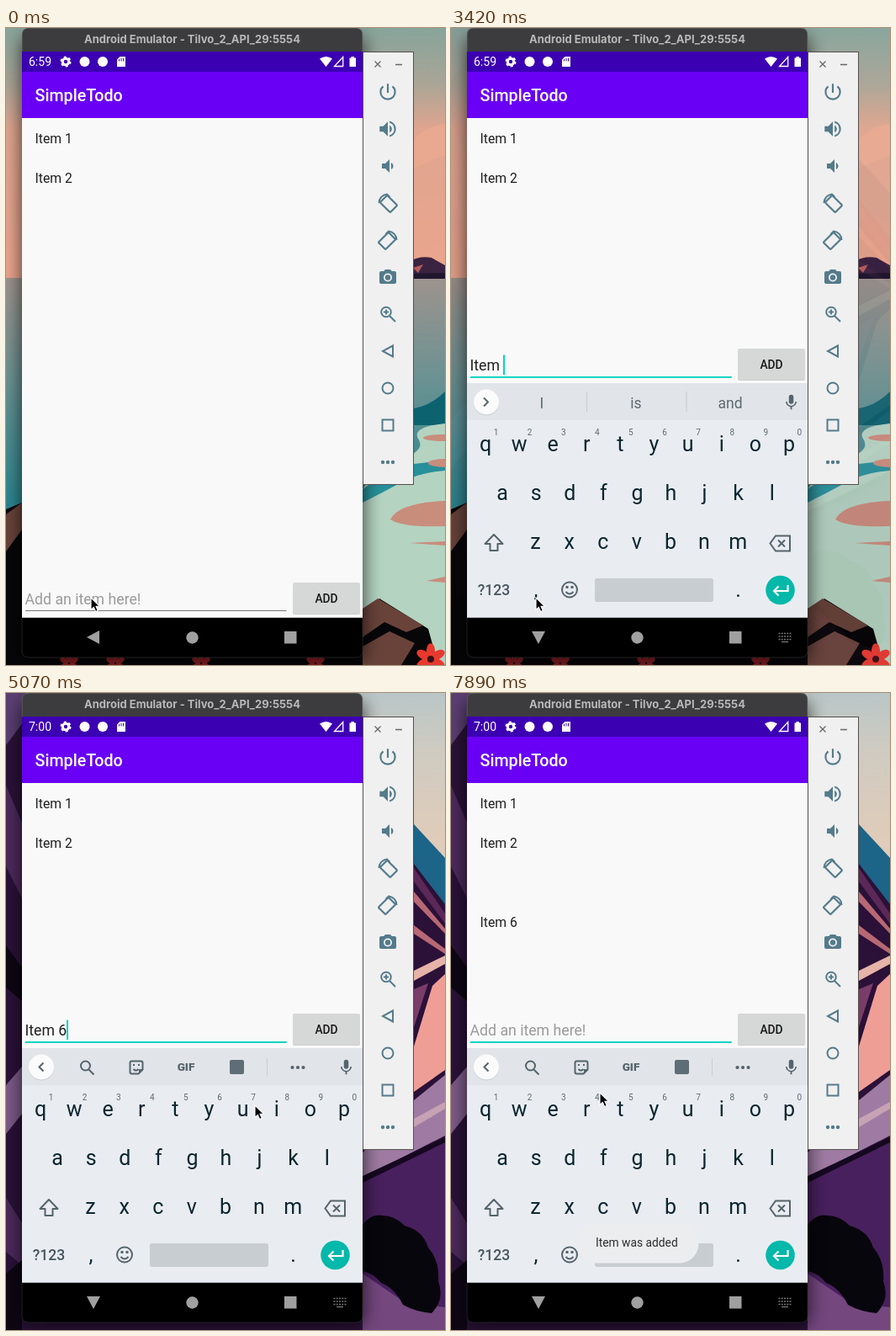
Recreate the animation shown at these times as an HTML page. Size 522 by 757 pixels, loop 8000 ms.

```html
<!DOCTYPE html>
<html lang="en">
<head>
<meta charset="utf-8">
<title>Todo list in an emulator</title>
<style>
html, body { margin: 0; width: 100%; height: 100%; overflow: hidden; background: #123; }
svg { display: block; width: 522px; height: 757px; font-family: Roboto, sans-serif; }
text { white-space: pre; }
.mid { text-anchor: middle; }
.item { font-size: 15.75px; fill: #1f1f1f; }
.edit { font-size: 17.7px; fill: #1f1f1f; }
.typing { text-decoration: underline; }
.hint { fill: #9a9a9a; }
.key { font-size: 25px; fill: #0b2530; text-anchor: middle; }
.num { font-size: 10px; fill: #5c6b73; text-anchor: middle; }
.sug { font-size: 17.5px; fill: #5c6a71; text-anchor: middle; }
.best { font-weight: 700; fill: #0b1518; }
.line { fill: none; stroke: #54646c; stroke-width: 2; }
.tool { fill: none; stroke: #547b8b; stroke-width: 2; }
</style>
</head>
<body>
<svg viewBox="0 0 522 757">
  <defs>
    <linearGradient id="dusk" x2="0" y2="1">
      <stop offset="0" stop-color="#87a49b"/><stop offset=".22" stop-color="#a9a596"/>
      <stop offset=".4" stop-color="#dfa58f"/><stop offset="1" stop-color="#eba58d"/>
    </linearGradient>
    <linearGradient id="lake" x2="0" y2="1">
      <stop offset="0" stop-color="#9d938d"/><stop offset=".25" stop-color="#6d9292"/>
      <stop offset=".6" stop-color="#298690"/><stop offset="1" stop-color="#0a6877"/>
    </linearGradient>
    <linearGradient id="haze" gradientUnits="userSpaceOnUse" x1="0" x2="0" y1="0" y2="170">
      <stop offset="0" stop-color="#b9c6c6"/><stop offset=".4" stop-color="#cfcbc1"/><stop offset="1" stop-color="#dfccba"/>
    </linearGradient>
    <filter id="soft" x="-20%" y="-20%" width="140%" height="140%"><feGaussianBlur stdDeviation="10"/></filter>
  </defs>

  <g id="lakeside">
    <path fill="url(#dusk)" d="M0 0H522V298H0Z"/>
    <path fill="#e9a890" d="M470 150q20-32 52-36v38q-20 6-52 22Z"/>
    <path fill="url(#lake)" d="M0 297H522V757H0Z"/>
    <path fill="#3a2341" d="M478 278q14-8 28-5l16 9v15H478Z"/>
    <path fill="#b55a5c" d="M484 285l12-4-6 10Z"/>
    <path fill="#20162e" d="M478 292l44-1v7h-44Z"/>
    <path fill="#0d6270" d="M424 440q60 30 98-8v40H424Z"/>
    <path fill="#b4d3c1" d="M522 470q-40 4-32 18 10 14-20 24t-46 36v209h98Z"/>
    <path fill="#27909a" d="M424 548q38-26 61-30l37-4v12q-30 2-52 14t-46 24Z"/>
    <g fill="#c98d7c">
      <ellipse cx="520" cy="487" rx="24" ry="4"/>
      <ellipse cx="522" cy="517" rx="20" ry="5"/>
      <path d="M457 584q10-20 65-22v30q-50 2-65-8Z"/>
      <path d="M480 612l42-2v5ZM500 657l22-5v7Z"/>
    </g>
    <path fill="#070608" d="M0 572l19-8 30 193H0ZM424 700l20-22 58 36 12 43H0v-10Z"/>
    <path fill="#69433a" d="M0 578l19-14v32L0 622ZM424 690l18-12 54 32-20 8-26-12-26 18ZM424 735l32-18 30 14-16 26h-46Z"/>
    <g id="flowers" fill="#8c1f22"></g>
  </g>

  <g id="peaks">
    <path fill="url(#haze)" d="M0 0H522V757H0Z"/>
    <path fill="#1c6488" d="M424 90l98 106v90l-98-70Z"/>
    <path fill="#2b1038" d="M424 190l61 13 37 48v506h-98Z"/>
    <path fill="#b86874" d="M485 236l37 44v6l-37-38ZM485 276l37 28v6l-37-24Z"/>
    <path fill="#5b2857" d="M485 208l37 54v12l-37-50Z"/>
    <path fill="#e6b3a8" d="M485 330l37-18v10l-37 20Z"/>
    <path fill="#ef9e96" d="M485 420l22-72 15-14v114l-37 26Z"/>
    <path fill="#7a3d69" d="M485 352l17-7-17 52Z"/>
    <path fill="#9f7ba3" d="M485 484l37-30v72l-98 50v-30Z"/>
    <path fill="#c7a2b5" d="M485 506l37-20v8l-37 22Z"/>
    <path fill="#48205d" d="M424 578l98-44v223h-98Z"/>
    <path fill="#150820" d="M424 574l98-46v6l-98 48Z"/>
    <path fill="#74477f" d="M424 690l50 34 48 6v27h-98Z"/>
    <path fill="#08060d" d="M424 632q10-14 24-11 14 0 26 12 22 6 28 26 14 16 12 40 8 22-8 38-20-2-34-10-10-20-26-26-10-12-22-14Z"/>
    <path fill="#2a1238" d="M0 0H24V757H0ZM0 740H424V757H0Z"/>
    <path fill="#5b3f72" d="M0 0H24V30L0 62Z"/>
    <path fill="#4c2a5c" d="M0 110l19 44v90L0 206ZM0 600l19 30v50L0 664Z"/>
    <path fill="#7d5b88" d="M0 466l19-22v56L0 524Z"/>
    <path fill="#0d0714" d="M0 300l19 26v40L0 350ZM0 690l19-16v83H0Z"/>
  </g>

  <rect x="17" y="10" width="410" height="742" rx="10" opacity=".6" filter="url(#soft)"/>
  <rect x="424.5" y="28.5" width="60" height="514" fill="#f0f0f0" stroke="#55504f"/>
  <g id="panel" fill="#547b8b">
    <path d="M438.500 39.500l7 7m0-7l-7 7M463 43.500h8" fill="none" stroke="#666" stroke-width="1.300"/>
    <g id="turn" class="tool" transform="translate(454 208)">
      <rect x="-6" y="-8.500" width="12" height="17" rx="1" transform="translate(1 1) rotate(-45)" stroke-width="2.200"/>
      <path d="M-10.500 0A10.500 10.500 0 0 1-1-10.500l3.500 3.500"/>
    </g>
    <use href="#turn" transform="matrix(-1 0 0 1 908 44)"/>
    <path class="tool" d="M460 377.500v13l-12-6.500Z"/>
    <circle class="tool" cx="454" cy="428" r="6.500"/>
    <rect class="tool" x="447.500" y="465.500" width="13" height="13"/>
    <circle cx="448" cy="516" r="2.200"/><circle cx="454" cy="516" r="2.200"/><circle cx="460" cy="516" r="2.200"/>
  </g>

  <path fill="#3c3c3e" d="M19 28V8q0-8 8-8H416q8 0 8 8V28Z"/>
  <text class="mid" x="221.500" y="18" fill="#b9b9ba" style="font:700 13px Inter,sans-serif">Android Emulator - Tilvo_2_API_29:5554</text>
  <path fill="#3c00b3" d="M19 28H424V52H19Z"/>
  <path fill="#6900f5" d="M19 52H424V107H19Z"/>
  <path fill="#f9f9f9" d="M19 107H424V702H19Z"/>
  <g fill="#fff">
    <g font-size="14"><text id="before" x="27" y="45">6:59</text><text id="after" x="27" y="45">7:00</text></g>
    <circle cx="71" cy="40" r="3.700" fill="none" stroke="#fff" stroke-width="3"/>
    <circle cx="71" cy="40" r="5.600" fill="none" stroke="#fff" stroke-width="1.800" stroke-dasharray="2.930"/>
    <circle cx="93.500" cy="40" r="6"/><circle cx="115" cy="40" r="6"/>
    <path d="M135.500 34H142V46H132V37.500Z"/>
    <path d="M134.500 37v2.500m2.500-3.500v3.500m2.500-3.500v3.500" stroke="#3c00b3"/>
    <path d="M373 36.500q7.500-5 15 0L380.500 46Z"/>
    <path d="M400.700 34.500V45.500H390.500Z" fill="none" stroke="#fff" stroke-width="1.300"/>
    <path d="M408.500 35.500h2v-1.500h3.500v1.500h2V46h-7.500Z"/>
    <text x="34.500" y="86.500" font-size="19.700" font-weight="500">SimpleTodo</text>
  </g>
  <text class="item" x="34.500" y="136.500">Item 1</text>
  <text class="item" x="34.500" y="183.800">Item 2</text>
  <text class="item" id="added" x="34.500" y="278.300">Item 6</text>

  <g id="bar">
    <path d="M23 414.500H333.500" stroke="#777"/>
    <path id="focus" d="M23 415H333.500" stroke="#04d3c3" stroke-width="2"/>
    <g id="texts" class="edit"><text id="hint" class="hint" x="22.500" y="407">Add an item here!</text></g>
    <g id="caret"><path id="blink" d="M0 388.500V412" stroke="#04d3c3" stroke-width="2"/></g>
    <rect x="341" y="382" width="80" height="37" rx="2" opacity=".18"/>
    <rect id="button" x="341" y="381" width="80" height="37" rx="2" fill="#d6d7d7"/>
    <text class="mid" x="381" y="404.500" font-size="13.800" font-weight="500" fill="#161616">ADD</text>
  </g>

  <g id="board">
    <path fill="#e9edf1" d="M19 422H424V702H19Z"/>
    <path fill="#e1e5e9" d="M19 422H424V466H19Z"/>
    <circle cx="42" cy="445.500" r="15" fill="#c9ced2"/><circle cx="42" cy="444.500" r="15" fill="#fbfbfb"/>
    <g id="tools">
      <path class="line" d="M44.500 439.500l-5 5 5 5"/>
      <path class="line" d="M98.500 447.500l6 6"/><circle class="line" cx="94.500" cy="443" r="5.500"/>
      <path class="line" d="M149.500 437.500h11q2 0 2 2v8l-5 5h-8q-2 0-2-2v-11q0-2 2-2ZM151.500 447q3 3 6 0" stroke-width="1.700"/>
      <path fill="#54646c" d="M151 441h2v2h-2ZM157 441h2v2h-2ZM163 447h-5v6Z"/>
      <text class="mid" x="214" y="449" font-size="13.500" font-weight="800" fill="#54646c">GIF</text>
      <rect x="266" y="436" width="17" height="17" rx="2" fill="#5f6e76"/>
      <path d="M310.500 434v21" stroke="#cbd0d4"/>
      <g fill="#54646c"><circle cx="340.500" cy="445" r="2.100"/><circle cx="347" cy="445" r="2.100"/><circle cx="353.500" cy="445" r="2.100"/></g>
    </g>
    <g id="words">
      <path class="line" d="M39 439.500l5 5-5 5"/>
      <path d="M161.500 432v24M280 432v24" stroke="#c5cbcf"/>
    </g>
    <g id="keys"></g>
    <path class="line" stroke-linejoin="round" d="M51 602l10.500 11h-6v8h-9v-8h-6Z"/>
    <path class="line" d="M386 603.500h17v18h-17l-6.500-9ZM389 608.500l8 8m0-8l-8 8" stroke-width="1.800"/>
    <text class="mid" x="51" y="674" font-size="17.500" font-weight="500" fill="#46565e">?123</text>
    <text class="key" x="101" y="676">,</text><text class="key" x="341.500" y="676">.</text>
    <circle class="line" cx="141" cy="667.500" r="9"/>
    <path class="line" d="M136.500 670q4.500 5 9 0" stroke-width="1.800"/>
    <path fill="#54646c" d="M136.500 663h3v3h-3ZM142.500 663h3v3h-3Z"/>
    <rect x="171" y="654" width="141" height="28" rx="3" fill="#c8cdd1"/>
    <circle cx="391.500" cy="668" r="17.300" fill="#04b8aa"/>
    <path d="M400.500 662v7H384m5.500-5.500l-5.500 5.500 5.500 5.500" fill="none" stroke="#fff" stroke-width="2.200"/>
    <g id="mic" fill="#54646c"></g>
  </g>
  <g id="toast">
    <rect x="149" y="630.500" width="145.500" height="47" rx="23" fill="#ebedef"/>
    <text x="172" y="658" font-size="13.800" fill="#2c2c2c">Item was added</text>
  </g>

  <path d="M19 701H424V740q0 8-8 8H27q-8 0-8-8Z" stroke="#333" stroke-width=".6"/>
  <g fill="#a0a0a0">
    <g transform="translate(104 724)"><path id="back" d="M-8 0L7-8V8Z"/></g>
    <circle cx="221.500" cy="724.500" r="7.200"/>
    <path d="M331 717h14.500v14.500H331Z"/>
    <g id="pad" stroke="#777"><path d="M389.500 719.500h15M389.500 723h15M389.500 726.500h15" stroke-width="1.700" stroke-dasharray="2 1.250"/><path d="M393 729.500h8" stroke-width="1.300"/></g>
  </g>
  <path d="M19.200 28V8q0-7.800 7.800-7.800H416q7.800 0 7.800 7.800V28" fill="none" stroke="#777" stroke-width=".5"/>

  <g id="mouse"><path d="M0 0V14.300L3.300 11.300 5.600 16.500 8.200 15.400 6 10.300H10.500Z" stroke="#fff" stroke-width="1.100"/></g>
</svg>
<script>
const LOOP = 8000;
const $ = id => document.getElementById(id);
const put = (id, html) => $(id).insertAdjacentHTML('beforeend', html);

// Static parts built from short rules
const icon = (x, y, s, d) => `<path transform="translate(${x - 12 * s} ${y - 12 * s}) scale(${s})" d="${d}"/>`;
const waves = 'M16.500 12c0-1.770-1.020-3.290-2.500-4.030v8.050c1.480-.730 2.500-2.250 2.500-4.020z';
const horn = 'M3 9v6h4l5 5V4L7 9z';
put('panel',
  icon(454, 76, 1.08, 'M13 3h-2v10h2zM17.830 5.170l-1.420 1.420A7 7 0 1 1 7.580 6.580L6.170 5.170a9 9 0 1 0 11.660 0z') +
  icon(454, 120, 1.08, horn + waves + 'M14 3.230v2.060a7 7 0 0 1 0 13.420v2.060a9 9 0 0 0 0-17.540z') +
  icon(456, 164, 1, horn + waves) +
  icon(454, 296, 1, 'M9 3L7.200 5H4q-2 0-2 2v11q0 2 2 2h16q2 0 2-2V7q0-2-2-2h-3.200L15 3zM12 17.500a5 5 0 1 1 0-10 5 5 0 0 1 0 10zM12 9.300a3.200 3.200 0 1 0 0 6.400 3.200 3.200 0 0 0 0-6.400z') +
  '<path class="tool" d="M456 342l7 7M449 337.500h6m-3-3v6"/><circle class="tool" cx="452" cy="337.500" r="5.800"/>');
put('mic', icon(404.500, 445, .92, 'M12 14a3 3 0 0 0 3-3V5a3 3 0 0 0-6 0v6a3 3 0 0 0 3 3zM17.300 11a5.300 5.300 0 0 1-10.600 0H5c0 3.400 2.700 6.200 6 6.700V21h2v-3.300c3.300-.500 6-3.300 6-6.700z'));

const row = (letters, x, y) => [...letters].map((c, i) => `<text class="key" x="${x + 40.1 * i}" y="${y}">${c}</text>`).join('');
put('keys', row('qwertyuiop', 41, 503) + row('asdfghjkl', 61, 560.5) + row('zxcvbnm', 100.5, 619) +
  [...'1234567890'].map((c, i) => `<text class="num" x="${53.5 + 40.1 * i}" y="484">${c}</text>`).join(''));

const petals = (x, y, r, fill) => [0, 1, 2, 3, 4, 5].map(i =>
  `<ellipse cx="${x}" cy="${y - r * .6}" rx="${r * .3}" ry="${r * .5}" fill="${fill}" transform="rotate(${i * 60} ${x} ${y})"/>`).join('');
put('flowers', [75, 130, 232, 368].map(x => petals(x, 755, 11, '#8c1f22')).join('') +
  petals(505, 750, 17, '#e8392f') + '<circle cx="505" cy="750" r="4" fill="#3a1012"/>');

// Held keyframes, with times in ms
const sheet = document.head.appendChild(document.createElement('style'));
function hold(id, prop, steps) {
  const frames = steps.map(([t, v]) => `${t / LOOP * 100}%{${prop}:${v}}`).join('');
  sheet.textContent += `@keyframes ${id}{${frames}}#${id}{animation:${id} ${LOOP}ms step-end infinite}\n`;
}
const show = (id, ...times) => hold(id, 'opacity', [[0, 0], ...times.map((t, i) => [t, 1 - i % 2])]);
const hide = (id, ...times) => hold(id, 'opacity', [[0, 1], ...times.map((t, i) => [t, i % 2])]);
const path = (id, steps) => hold(id, 'transform', steps.map(([t, x, y]) => [t, `translate(${x}px,${y}px)`]));

// Typed text with its suggestions
const typed = [
  [1630, 1780, 'I', 'I', 'I’m', 'I’ll'],
  [1780, 2080, 'It', 'It', 'It’s', 'Its'],
  [2080, 2230, 'Ite', 'Ite', 'Item', 'It'],
  [2230, 2370, 'Item', 'Items', 'Item', 'Itemized'],
  [2370, 4020, 'Item ', 'I', 'is', 'and'],
  [4020, 5950, 'Item 6']
];
typed.forEach(([from, to, text, ...words], i) => {
  put('texts', `<text id="typed${i}" class="${i < 4 ? 'typing' : ''}" x="22.500" y="407">${text}</text>`);
  show('typed' + i, from, to);
  if (!words.length) return;
  put('words', `<g id="words${i}">` + words.map((w, j) =>
    `<text class="sug ${j === 1 && i < 4 ? 'best' : ''}" x="${[108, 220, 332][j]}" y="451.500">${w}</text>`).join('') + '</g>');
  show('words' + i, from, to);
});
hide('hint', 1630, 5950);
hide('tools', 1630, 4020);
show('words', 1630, 4020);

show('focus', 140);
show('blink', 140, 890, 1330, 2820, 3420, 3870, 4020, 4470, 5070, 5520, 5950, 6550, 7000, 7440);
path('caret', [[0, 24, 0], [1630, 28, 0], [1780, 34, 0], [2080, 43, 0], [2230, 58.500, 0], [2370, 63, 0], [4020, 73, 0], [5950, 24, 0]]);
path('bar', [[0, 0, 278], [440, 0, 0]]);
show('board', 440);
hold('back', 'transform', [[0, 'rotate(0deg)'], [140, 'rotate(-45deg)'], [440, 'rotate(-90deg)']]);
show('pad', 440);

hide('before', 3870);
show('after', 3870);
hold('peaks', 'opacity', [[0, 0], [3420, .06], [3570, .18], [3720, .36], [3870, .53], [4020, .7], [4170, .85], [4320, .94], [4470, 1]]);

show('added', 5950);
hold('button', 'fill', [[0, '#d6d7d7'], [5820, '#b6b9b9'], [6250, '#c6c8c8'], [6400, '#d6d7d7']]);
hold('toast', 'opacity', [[0, 0], [5950, .12], [6100, .4], [6250, .72], [6400, .92], [6550, 1]]);
path('mouse', [
  [0, 101, 677], [4770, 120, 665], [4920, 215, 580], [5070, 296, 490], [5220, 360, 420], [5370, 382, 391],
  [7150, 380, 430], [7300, 352, 560], [7440, 300, 690], [7590, 235, 640], [7740, 190, 530], [7890, 177, 475]
]);
</script>
</body>
</html>
```
